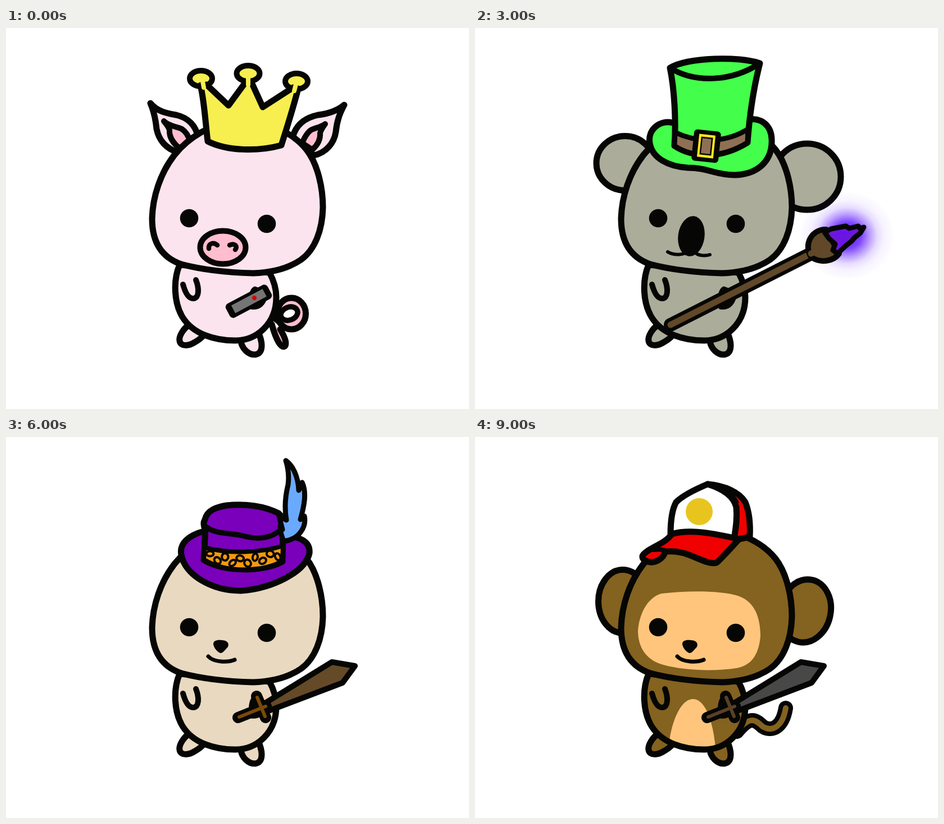
An HTML page that plays this animation: 824x679 px, repeating every 10000 ms.

```html
<!DOCTYPE html>
<html lang="en">
<head>
<meta charset="utf-8">
<title>Dress-up animals</title>
<style>
html, body { margin: 0; width: 100%; height: 100%; overflow: hidden; background: #fff; }
svg { display: block; width: 100%; height: 100%; }
</style>
</head>
<body>
<svg id="stage" viewBox="0 0 824 679" fill="none" stroke-linecap="round" stroke-linejoin="round"></svg>
<script>
const INK = '#060604';
const LINE = 11;
const STEP = 1000;

// Drawing helpers
const path = (d, fill = 'none', w = LINE, ink = INK) =>
  `<path d="${d}" fill="${fill}" stroke="${ink}" stroke-width="${w}"/>`;
const flat = (d, fill) => `<path d="${d}" fill="${fill}"/>`;
const oval = (x, y, rx, ry, fill, w = 0, turn = 0, ink = INK) =>
  `<ellipse cx="${x}" cy="${y}" rx="${rx}" ry="${ry}" fill="${fill}" stroke="${ink}" stroke-width="${w}" transform="rotate(${turn} ${x} ${y})"/>`;
const box = (x, y, w, h, fill, r = 0) =>
  `<rect x="${x}" y="${y}" width="${w}" height="${h}" rx="${r}" fill="${fill}"/>`;
const tube = (d, fill, outer, inner, ink = INK) =>
  path(d, 'none', outer, ink) + path(d, 'none', inner, fill);

// Animals
const BODY = 'M309 422C297 450 299 490 314 515C333 546 372 557 408 557C446 557 481 527 481 480C481 462 476 449 469 436Z';
const HEAD = 'M260 340C261 300 275 258 300 226C325 195 365 170 410 165C460 163 510 185 535 217C555 243 564 285 564 320C563 360 550 395 525 413C500 430 470 436 440 437C400 436 350 431 312 421C280 410 260 385 260 340Z';
const SNOUT = 'M369 370C368 362 378 361 383 362C392 362 398 366 395 374C390 379 386 386 381 385C377 383 371 378 369 370Z';
const SMILE = 'M360 391C370 402 395 402 407 397';

const animals = {
  pig: {
    skin: '#fce4ee',
    back(skin) {
      const pink = '#ffbdd0';
      return path('M257 134C268 148 285 152 303 155C325 160 338 175 342 195L305 221C285 215 272 200 268 180C266 160 263 148 257 134Z', skin) +
        path('M281 166C290 175 305 176 313 180C322 186 326 196 328 203L308 214C299 206 290 196 291 182C289 175 284 170 281 166Z', pink, 10) +
        path('M602 137C588 149 572 153 555 155C532 160 516 172 510 195L548 227C570 222 584 205 587 185C589 165 594 152 602 137Z', skin) +
        path('M568 171C558 178 548 178 541 183C533 190 530 198 527 205L545 217C553 210 560 200 559 187C561 181 565 175 568 171Z', pink, 10) +
        path('M473 528C479 550 487 568 494 568C502 566 497 552 488 537', pink) +
        oval(508, 509, 25.5, 28, pink, LINE) +
        oval(504, 509, 15.5, 11.5, '#fff', 9.5, -22) +
        path('M480 520L494 531', 'none', 9);
    },
    face: () => oval(386, 391, 40.5, 29.5, '#ffbdd0', 10) +
      path('M361 393C360 384 369 381 376 387M398 387C407 383 413 389 408 395', 'none', 8.5)
  },
  koala: {
    skin: '#abac9a',
    back: skin => oval(267, 241, 51, 48.5, skin, LINE) + oval(591, 265, 60, 59, skin, LINE),
    face: () => oval(385, 371, 23.5, 36, INK, 0, 8) +
      path('M343 399C353 405 368 405 376 400L392 400C398 407 412 406 418 404', 'none', 6)
  },
  rabbit: {
    skin: '#b9c4b5',
    ink: '#101410',
    back: (skin, ink) =>
      path('M342 170C325 120 300 86 272 88C240 92 206 130 207 160C210 185 255 183 282 155C295 163 305 175 312 181', skin, LINE, ink) +
      path('M530 180C545 155 565 107 600 107C640 110 665 170 658 190C650 205 620 202 603 185C600 175 592 170 586 171C570 178 555 187 545 195', skin, LINE, ink) +
      path('M480 498C495 490 506 500 505 517C502 534 486 541 470 534', skin, LINE, ink),
    face: ink => flat(SNOUT, ink) +
      path('M343 399C358 407 378 403 381 384C384 402 400 407 418 404', 'none', 6, ink)
  },
  monkey: {
    skin: '#84621f',
    back: skin => oval(263, 293, 43.5, 56.5, skin, LINE) +
      oval(588, 310, 45, 56.5, skin, LINE, 12) +
      tube('M466 525C490 495 500 505 512 516C530 527 548 515 553 483', skin, 26, 10),
    belly: 'M346 541C350 510 365 467 388 467C412 467 425 515 428 555L400 556Q368 552 346 541Z',
    mask: 'M332 279C380 273 440 274 468 283C492 291 508 313 508 355C505 390 490 408 465 412C425 418 370 416 335 406C305 398 290 375 290 345C293 310 310 285 332 279Z',
    face: ink => flat(SNOUT, ink) + path(SMILE, 'none', 7)
  },
  cub: {
    skin: '#e9d9c0',
    back: () => '',
    face: ink => flat(SNOUT, ink) + path(SMILE, 'none', 7)
  }
};

function drawAnimal({ skin, ink = INK, back, belly, mask, face }) {
  const tan = '#ffc57c';
  return back(skin, ink) +
    path('M328 528C316 534 307 550 309 558C311 568 325 567 336 560C345 555 350 550 353 546', skin, LINE, ink) +
    path('M418 558C420 572 432 583 444 582C456 580 458 566 451 547', skin, LINE, ink) +
    flat(BODY, skin) + (belly ? flat(belly, tan) : '') + path(BODY, 'none', LINE, ink) +
    flat(HEAD, skin) + (mask ? flat(mask, tan) : '') + path(HEAD, 'none', LINE, ink) +
    oval(326, 339, 16.3, 16.3, ink) + oval(464, 349, 16.3, 16.3, ink) + face(ink) +
    path('M315 457C318 468 323 482 333 482C344 482 344 464 338 449', 'none', 10, ink) +
    path('M437 498C433 478 438 466 443 464C450 466 459 471 462 478C459 492 450 500 437 498Z', ink, 7, ink);
}

// Hats
function crown() {
  const gold = '#f7ee50';
  return oval(347, 90, 20, 14, gold, 10) + oval(431, 81, 20.5, 14, gold, 10) + oval(517, 95, 20, 14, gold, 10) +
    path('M346 102L357 101L396 138L426 97L437 97L457 141L511 106L520 108C509 150 496 190 490 209C450 220 395 220 359 202C355 170 353 130 346 102Z', gold) +
    path('M350 95L352 106M431 90L431 101M516 100L513 112', 'none', 8, gold);
}

function topHat(color) {
  const band = '#8f7055';
  return path('M352 169C328 163 307 182 311 205C315 232 345 247 378 249C415 249 428 262 462 262C505 261 530 235 528 198C527 172 508 160 488 163Z', color) +
    path('M347 71C355 110 358 165 355 210C390 233 440 232 485 204C489 150 495 110 507 63C470 50 380 52 347 71Z', color) +
    path('M356 186C400 207 450 203 486 180L485 204C440 232 390 233 355 210Z', band, 9) +
    path('M347 71C390 98 455 97 507 63', 'none', 10) +
    `<g transform="translate(411.5 210.5) rotate(6)">${box(-24, -28, 48, 56, INK, 6)}${box(-14.5, -20.5, 29, 41, '#ffe81a')}${box(-10.5, -16, 21, 32, INK)}${box(-8, -13.5, 16, 27, band)}</g>`;
}

function featherHat() {
  const violet = '#7a00bc';
  const band = 'M353 197C400 209 455 206 493 194L492 221C460 241 390 243 352 218Z';
  let spots = '';
  for (let i = 0; i < 10; i++) {
    const x = 363 + i * 13.4;
    const y = 212 + 10 * Math.sin(i / 9 * Math.PI) + (i % 2 ? 5 : -4) - i * 0.4;
    spots += oval(x, y, 6.5, 4.5 + i % 3 * 0.6, 'none', 4, i * 47);
  }
  return path('M352 168C325 175 308 190 312 210C318 245 365 274 418 274C475 270 533 240 540 207C542 185 520 177 498 177Z', violet) +
    path('M354 147C358 130 375 125 392 122C425 118 460 123 485 136C492 142 494 150 493 165L492 222C460 240 390 242 352 219L355 165C351 158 351 152 354 147Z', violet) +
    flat(band, '#f59a0e') + spots + path(band, 'none', 8) +
    path('M356 160C375 175 405 170 425 177C450 183 472 180 488 166', 'none', 9.5) +
    path('M498 42C510 50 520 70 521 95L527 81C536 100 530 125 524 147L531 141C535 160 522 182 495 186C490 178 488 168 488 158L492 165L486 141L499 148C495 125 497 105 502 85C504 70 502 55 498 42Z', '#69aaff', 9);
}

function fedora() {
  const gray = '#757575', ink = '#05050f';
  return path('M350 168C318 175 288 193 292 213C300 245 360 264 425 264C490 262 538 235 542 207C540 185 520 170 500 165Z', gray, 10, ink) +
    path('M352 160C362 125 385 92 415 91C440 90 440 104 458 101C475 94 490 98 493 120C496 140 494 155 500 165L495 205L352 200Z', gray, 10, ink) +
    flat('M348 157C365 175 395 184 425 183C455 183 485 175 499 163C507 172 508 190 501 204C485 220 440 222 405 217C375 216 350 210 345 190C342 175 343 165 348 157Z', ink);
}

function cap() {
  const red = '#f00000';
  return path('M414 84C445 87 470 98 481 116C490 138 490 160 489 178L460 184Z', red) +
    path('M348 174C348 150 350 130 358 116C370 104 395 92 414 84C440 92 460 104 465 125C467 145 464 162 461 182Z', '#fff') +
    path('M418 85C438 90 454 98 465 116', 'none', 9) +
    oval(399, 133, 24, 24, '#e8c51e') +
    path('M298 212C303 200 340 190 350 173C385 163 430 173 470 182C455 198 440 215 430 224C415 228 395 214 372 207C355 203 345 203 338 205C335 218 320 224 312 223C303 222 297 217 298 212Z', red) +
    path('M318 201Q333 199 345 204', 'none', 8);
}

// Held items
const pointer = () =>
  `<g transform="translate(432 487) rotate(-28)">${box(-42, -14, 84, 28, INK, 7)}${box(-31, -8, 63, 15.5, '#757575')}</g>` +
  oval(442, 481, 4, 4, '#d80000');

function branch() {
  const d = 'M383 511L598 404C606 396 602 382 611 376L611 358M598 404C625 405 635 392 668 382';
  return [[26, INK], [15, '#35333a'], [11, '#6d6776'], [6, '#b0a6ba']]
    .map(([w, c]) => path(d, 'none', w, c)).join('');
}

function staff(wood, flame, glow) {
  const stops = [[0, 1], [0.3, 0.8], [0.5, 0.4], [0.65, 0.15], [0.8, 0.05], [1, 0.01]]
    .map(([at, a]) => `<stop offset="${at}" stop-color="${glow}" stop-opacity="${a}"/>`).join('');
  return `<radialGradient id="glow">${stops}</radialGradient>` +
    oval(662, 370, 83, 77, 'url(#glow)') +
    tube('M348 529L600 401', wood, 24, 11) +
    path('M598 408C584 385 600 358 625 359L648 402C638 416 615 420 598 408Z', wood, 10) +
    path('M598 402L610 396', 'none', 11, wood) +
    path('M622 364L634 358L660 353L666 357L682 353L685 357L692 355L686 365L675 374L670 380L660 388L645 402L637 396L641 385L630 375Z', flame, 9) +
    path('M640 369L658 365L669 364M652 384L660 374', 'none', 2.5, glow);
}

const sword = (blade, hilt) =>
  path('M463 473L580 401L621 408L599 438L470 487Z', blade, 10) +
  path('M446 462L462 500M413 500L463 480', 'none', 20) +
  path('M447 464L461 498M415 499L462 480', 'none', 6, hilt);

const redStaff = () => staff('#202223', '#8a1c05', '#a33210');
const violetStaff = () => staff('#604828', '#6f16dd', '#5b14ff');
const woodSword = () => sword('#654a28', '#7a4a08');
const ironSword = () => sword('#484848', '#5a4028');

const scenes = [
  ['pig', crown, pointer],
  ['koala', () => topHat('#e83400'), branch],
  ['pig', featherHat, redStaff],
  ['koala', () => topHat('#43ff4b'), violetStaff],
  ['monkey', () => topHat('#43ff4b'), woodSword],
  ['rabbit', fedora, woodSword],
  ['cub', featherHat, woodSword],
  ['pig', fedora, violetStaff],
  ['pig', cap, ironSword],
  ['monkey', cap, ironSword]
].map(([name, hat, item]) => drawAnimal(animals[name]) + hat() + item());

const stage = document.getElementById('stage');
const start = performance.now();
let shown = -1;

function update(now) {
  const index = Math.floor(Math.max(0, now - start) / STEP) % scenes.length;
  if (index !== shown) stage.innerHTML = scenes[shown = index];
  requestAnimationFrame(update);
}
update(start);
</script>
</body>
</html>
```
